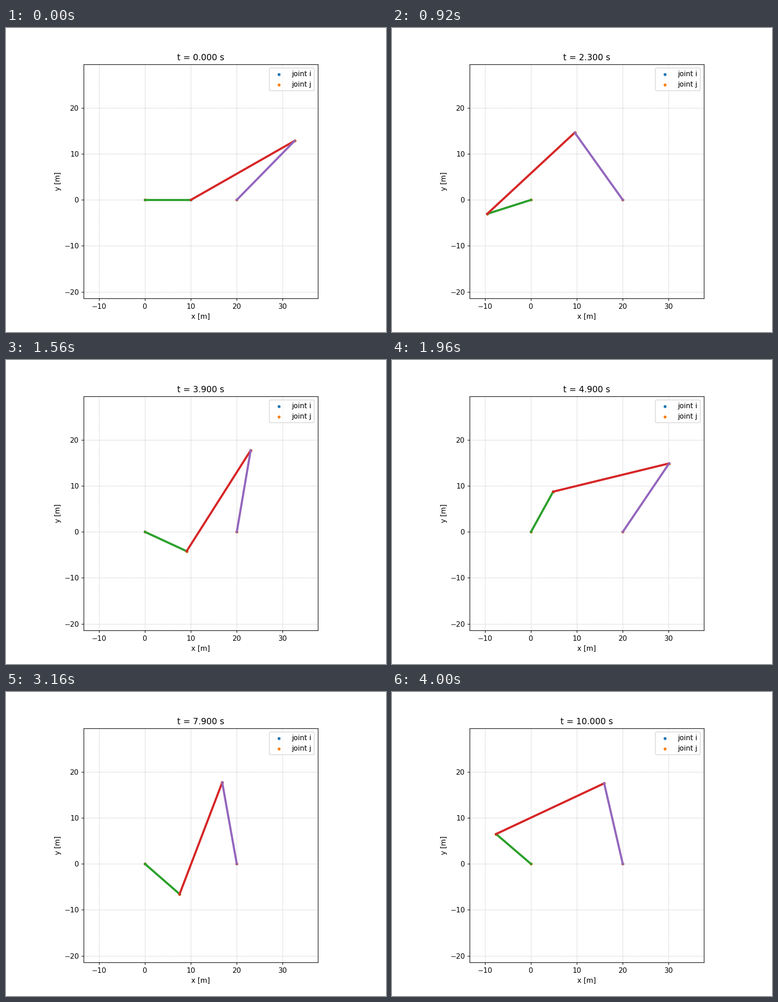
A matplotlib script for the animation above (4.04 s loop, 837 by 669 pixels).

```python
import numpy as np
import matplotlib.pyplot as plt
from matplotlib.animation import FuncAnimation

DPI = 111.6
W, H = 837, 669
CRANK, COUPLER, ROCKER, BASE = 10.0, 26.0, 18.0, 20.0
OMEGA = 1.5          # crank speed, rad/s
DT = 0.1             # simulated seconds per frame
FRAMES = 101

O = np.array([0.0, 0.0])
D = np.array([BASE, 0.0])


def linkage(t):
    """Joint positions O, A, B, D of the four-bar linkage at time t."""
    a = CRANK * np.array([np.cos(OMEGA * t), np.sin(OMEGA * t)])
    d = D - a
    dist = np.hypot(*d)
    u = d / dist
    along = (COUPLER**2 - ROCKER**2 + dist**2) / (2 * dist)
    across = np.sqrt(COUPLER**2 - along**2)
    b = a + along * u + across * np.array([-u[1], u[0]])
    return np.array([O, a, b, D])


# The tiny margin keeps the pixel size from being rounded down.
fig, ax = plt.subplots(figsize=((W + 1e-3) / DPI, (H + 1e-3) / DPI), dpi=DPI)

# Square view around the full reach of the mechanism.
x_max = ((CRANK + COUPLER)**2 + BASE**2 - ROCKER**2) / (2 * BASE)
cx, cy = (x_max - CRANK) / 2, (ROCKER - CRANK) / 2
half = 1.15 * (x_max + CRANK) / 2

start = linkage(0)
dots = [ax.scatter(*start.T, s=10, label=f"joint {k}") for k in "ij"]
bars = [ax.plot(*start[k:k + 2].T, color=f"C{k + 2}", lw=3)[0]
        for k in range(3)]

ax.set_aspect("equal")
ax.set_xlim(cx - half, cx + half)
ax.set_ylim(cy - half, cy + half)
ax.set_xlabel("x [m]")
ax.set_ylabel("y [m]")
ax.grid(ls=":")
ax.legend(loc="upper right")
title = ax.set_title("t = 0.000 s")


def update(i):
    t = i * DT
    pts = linkage(t)
    for dot in dots:
        dot.set_offsets(pts)
    for k, bar in enumerate(bars):
        bar.set_data(*pts[k:k + 2].T)
    title.set_text(f"t = {t:.3f} s")
    return [*dots, *bars, title]


anim = FuncAnimation(fig, update, frames=FRAMES, interval=40,
                     repeat=True, repeat_delay=0, blit=False)
plt.show()
```
